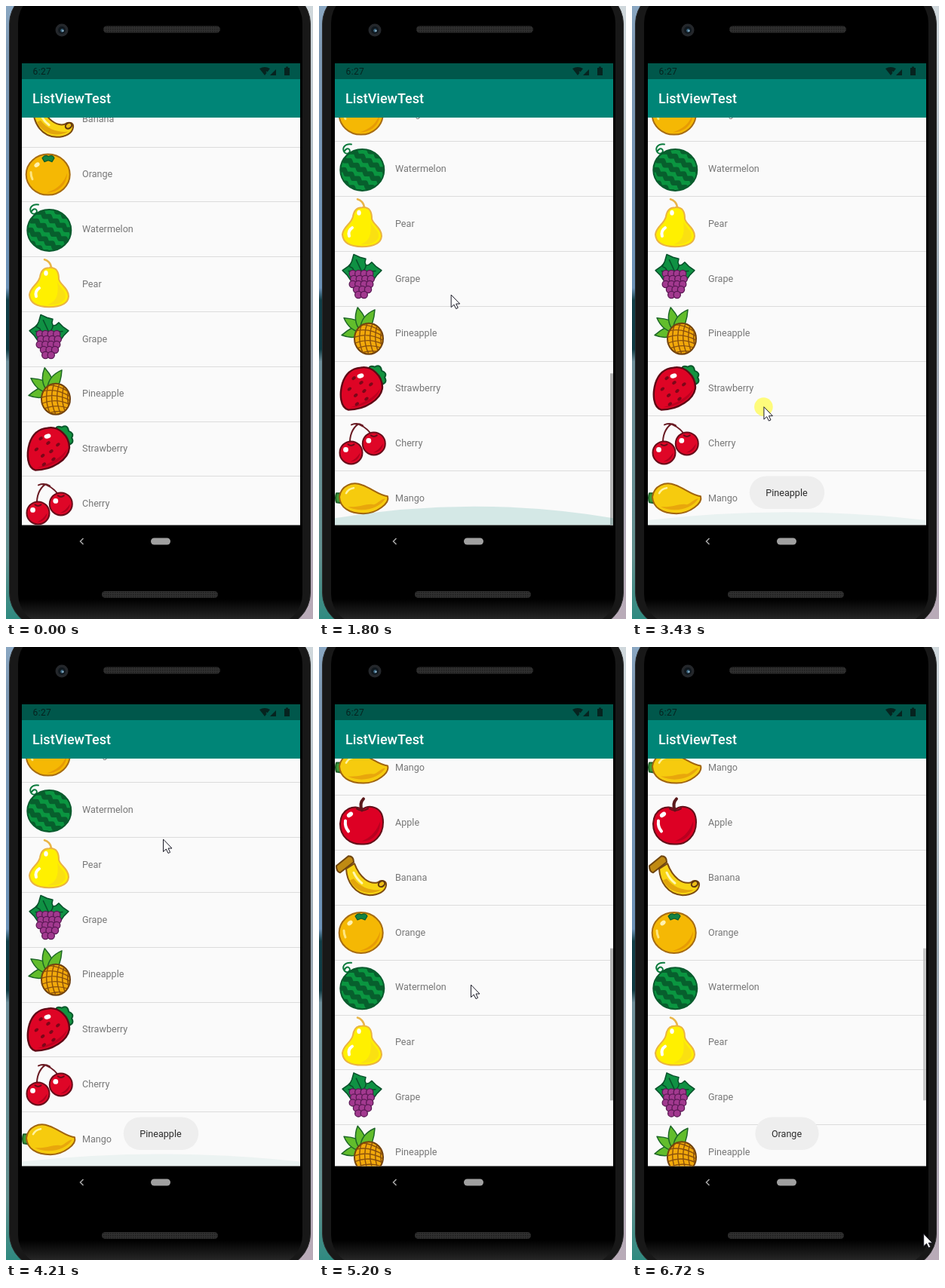
An HTML page for the animation above (7150 ms loop, 407x813 px).

```html
<!DOCTYPE html>
<html lang="en">
<head>
<meta charset="utf-8">
<title>ListViewTest</title>
<style>
  html, body { margin: 0; width: 100%; height: 100%; overflow: hidden; background: #000; }
  svg { display: block; width: 100vw; height: 100vh; }
  text { font-family: Roboto, sans-serif; font-size: 12.6px; }
  .label { fill: #777; }
  .line { fill: #dcdcdc; shape-rendering: crispEdges; }
  symbol { overflow: visible; stroke-width: 2; stroke-linejoin: round; stroke-linecap: round; }
  .n { fill: none; }
  .w { fill: #fff; stroke: none; }
  .shade { stroke: none; }
</style>
</head>
<body>
<svg viewBox="0 0 407 813" preserveAspectRatio="none">
  <defs>
    <linearGradient id="left" x2="0" y2="1">
      <stop offset="0" stop-color="#8aa7c2"/><stop offset=".07" stop-color="#7e99b3"/>
      <stop offset=".46" stop-color="#6c92b8"/><stop offset=".48" stop-color="#113f48"/>
      <stop offset=".56" stop-color="#0e3a42"/><stop offset=".58" stop-color="#6f8f9b"/>
      <stop offset=".9" stop-color="#62908f"/><stop offset="1" stop-color="#2f8a80"/>
    </linearGradient>
    <linearGradient id="right" x2="0" y2="1">
      <stop offset="0" stop-color="#d0d8dc"/><stop offset=".5" stop-color="#9aa8b3"/>
      <stop offset="1" stop-color="#b9abb8"/>
    </linearGradient>
    <linearGradient id="chin" x2="0" y2="1">
      <stop offset=".96" stop-color="#000"/><stop offset="1" stop-color="#303030"/>
    </linearGradient>
    <pattern id="mesh" width="3" height="3" patternUnits="userSpaceOnUse">
      <path d="M0 0H3V3H0Z" fill="#303030"/><path d="M0 0H1.5V1.5H0Z" fill="#1c1c1c"/>
    </pattern>
    <clipPath id="view"><path d="M21 148H390V688.5H21Z"/></clipPath>
    <clipPath id="melon"><ellipse cx="36.3" cy="38" rx="29" ry="27.5"/></clipPath>
    <clipPath id="pine"><ellipse cx="45" cy="43.5" rx="19" ry="20.5"/></clipPath>

    <symbol id="Apple">
      <path d="M36 19C46 12 64 15 64 36C64 54 51 66 37 65C20 66 7 55 7 38C8 17 27 12 36 19Z" fill="#dd0024" stroke="#641019"/>
      <path d="M60 35C61 50 50 62 36 61C48 56 55 48 60 35Z" fill="#b9001f" class="shade"/>
      <path d="M36 20Q32 11 38 5" class="n" stroke="#5b1a1c" stroke-width="4"/>
      <path d="M29 18Q36 23 44 18" class="n" stroke="#641019"/>
      <ellipse cx="20" cy="26" rx="4.5" ry="3" transform="rotate(-35 20 26)" class="w"/>
      <path d="M14 34Q13 42 18 48" class="n" stroke="#fff" stroke-width="4"/>
    </symbol>
    <symbol id="Banana">
      <path d="M15 25C16 42 26 59 46 60C58 60 67 55 68 47C69 41 62 39 57 43C46 46 33 37 26 18Z" fill="#f8d414" stroke="#7e4d12"/>
      <path d="M20 40C27 56 47 61 61 53C48 54 34 50 25 38Z" fill="#e3a60c" class="shade"/>
      <path d="M2 21L18 8Q25 8 25 16L7 30Q2 29 2 21Z" fill="#c08a12" stroke="#6e4510"/>
      <ellipse cx="62" cy="45" rx="4.5" ry="3.5" fill="#edbe18" stroke="#5e3510" transform="rotate(-35 62 45)"/>
      <path d="M25 30Q29 39 36 44" class="n" stroke="#fff8b0" stroke-width="3"/>
    </symbol>
    <symbol id="Orange">
      <ellipse cx="34.7" cy="37" rx="29" ry="27" fill="#f5b804" stroke="#a76c12"/>
      <path d="M60 35C60 51 48 61 33 61C48 56 56 48 60 35Z" fill="#e79b05" class="shade"/>
      <path d="M27 15Q31 10 35 13Q41 10 43 15L40 20L35 18L30 20Z" fill="#138443" stroke="#0b5a2c" stroke-width="1.2"/>
      <ellipse cx="20" cy="24" rx="4" ry="2.7" transform="rotate(-38 20 24)" fill="#fff2b0"/>
      <path d="M12 34Q12 39 14 43" class="n" stroke="#ffe680" stroke-width="3"/>
    </symbol>
    <symbol id="Watermelon">
      <path d="M22 4C12 3 9 10 13 15C17 19 23 13 18 10Q15 9 13 13" class="n" stroke="#0b7a3c"/>
      <ellipse cx="36.3" cy="38" rx="29" ry="27.5" fill="#0a9540" stroke="#08592d"/>
      <g clip-path="url(#melon)"><g id="stripes" class="n" stroke="#075f2d" stroke-width="6.5" transform="translate(36 38) rotate(32)"></g></g>
    </symbol>
    <symbol id="Pear">
      <path d="M39 16C39 9 34 5 30 4" class="n" stroke="#e9b548" stroke-width="2.6"/>
      <path d="M36 15C47 14 49 22 49 30C51 38 62 42 62 53C61 64 48 67 36 67C22 67 11 63 10 51C11 40 22 37 24 27C25 20 29 15 36 15Z" fill="#fff000" stroke="#eab441"/>
      <path d="M47 33C51 43 59 45 58 54C55 63 43 65 34 64C47 59 49 50 47 33Z" fill="#fae012" class="shade"/>
      <ellipse cx="32" cy="22" rx="2.7" ry="3.5" class="w"/>
      <path d="M23 42Q17 46 19 53" class="n" stroke="#fff" stroke-width="4"/>
    </symbol>
    <symbol id="Grape">
      <g id="vine" fill="#0f9143" stroke="#07502a" stroke-width="1.5"></g>
      <g id="bunch" fill="#a2398f" stroke="#591853" stroke-width="1.3"></g>
    </symbol>
    <symbol id="Pineapple">
      <g id="crown" fill="#62bd2c" stroke="#1d6727" stroke-width="1.5"></g>
      <ellipse cx="45" cy="43.5" rx="19" ry="20.5" fill="#f2a90b" stroke="#70410d"/>
      <g clip-path="url(#pine)" id="lattice" class="n" stroke="#8a500c" stroke-width="1.4"></g>
    </symbol>
    <symbol id="Strawberry">
      <path d="M45 12Q45 5 53 8Q61 4 62 13Q70 16 66 22Q71 30 59 32Z" fill="#12933f" stroke="#08582c"/>
      <path d="M34 9C49 6 63 20 63 35C62 51 40 65 18 65C7 62 6 44 10 30C14 17 23 10 34 9Z" fill="#de0425" stroke="#5f0915" stroke-width="2.4"/>
      <path d="M60 37C57 51 39 61 20 62C38 56 52 49 60 37Z" fill="#be001f" class="shade"/>
      <g id="seeds" fill="#7c0718"></g>
      <ellipse cx="34" cy="20" rx="4.5" ry="3" transform="rotate(-15 34 20)" class="w"/>
    </symbol>
    <symbol id="Cherry">
      <path d="M20 39Q19 20 31 11Q45 17 51 29M22 12Q30 9 37 13" class="n" stroke="#6a1c24"/>
      <g id="cherries"></g>
    </symbol>
    <symbol id="Mango">
      <path d="M7 30L2 30Q0 36 2 42L8 43Z" fill="#3d9b37" stroke="#20602a"/>
      <path d="M6 35C8 20 23 14 36 19C48 23 59 33 70 34C73 43 56 57 38 57C19 57 7 49 6 35Z" fill="#f6cb0e" stroke="#a0640f"/>
      <path d="M67 37C59 50 36 57 17 48C34 49 43 43 51 45C57 44 60 38 67 37Z" fill="#e8a60c" class="shade"/>
      <path d="M15 30Q18 24 25 23" class="n" stroke="#fff3a0" stroke-width="2.5"/>
    </symbol>
  </defs>

  <path d="M0 0H204V813H0Z" fill="url(#left)"/>
  <path d="M204 0H407V813H204Z" fill="url(#right)"/>
  <rect x="4.5" y="-22" width="399" height="846" rx="46" fill="#181818" stroke="#2a2a2a"/>
  <rect x="16" y="-18" width="377" height="838" rx="40" fill="url(#chin)"/>
  <circle cx="74" cy="32" r="8.5" fill="#24272b"/><circle cx="74" cy="32" r="5" fill="#10181e"/>
  <circle cx="74.5" cy="32.5" r="2.2" fill="#426d88"/><circle cx="75.5" cy="33" r=".9" fill="#b5d5e5"/>
  <rect x="129" y="26.5" width="155" height="9" rx="4.5" fill="url(#mesh)"/>
  <rect x="127" y="776" width="154" height="9" rx="4.5" fill="url(#mesh)"/>

  <path d="M21 147H390V688.5H21Z" fill="#fafafa"/>
  <g clip-path="url(#view)">
    <g id="list"></g>
    <rect id="bar" x="386" width="4" fill="#b5b5b5"/>
    <path id="glow" d="M-184.5 0V-6Q0-26 184.5-6V0Z" fill="#008577"/>
  </g>

  <path d="M21 76H390V97H21Z" fill="#00574b"/>
  <path d="M21 97H390V148H21Z" fill="#008577"/>
  <text x="35.5" y="91" fill="#06231f" style="font-size:12px;letter-spacing:.4px">6:27</text>
  <g fill="#06231f">
    <path d="M336 83Q343 79 350 83L343 92Z"/><path d="M358 84V92H350Z"/>
    <path d="M369 82H371V80.5H374V82H376V92H369Z"/>
    <path d="M345 87L349 91M349 87L345 91" stroke="#00574b" stroke-width="1.3"/>
  </g>
  <text x="35" y="129.3" fill="#fff" style="font-size:18px;font-weight:500">ListViewTest</text>

  <path d="M102.5 706L98.5 710L102.5 714" fill="none" stroke="#aaa" stroke-width="1.5"/>
  <rect x="192" y="705.5" width="26" height="9" rx="4.5" fill="#a0a0a0"/>

  <g id="toast">
    <rect y="623.5" height="43.5" rx="21.7" fill="#eee"/>
    <text x="205" y="650.3" text-anchor="middle" fill="#2c2c2c"></text>
  </g>
  <g id="cursor">
    <circle id="press" r="12.3" fill="#fffb4a" fill-opacity=".72"/>
    <path d="M.5 0V16.5L4.3 13L7 18.5L9.6 17.3L7 12H12Z" fill="#fff" stroke="#1c1c28"/>
  </g>
</svg>
<script>
const $ = id => document.getElementById(id);
const set = (el, attrs) => {
  for (const k in attrs) el.setAttribute(k, attrs[k]);
  return el;
};
const add = (parent, tag, attrs, text = '') => {
  const el = set(document.createElementNS('http://www.w3.org/2000/svg', tag), attrs);
  el.textContent = text;
  return parent.appendChild(el);
};

const LOOP = 7150, STEP = 110.4, ROW = 72.8, TOP = 147, VIEW = 542;
const fruits = 'Apple Banana Orange Watermelon Pear Grape Pineapple Strawberry Cherry Mango'.split(' ');
const COUNT = fruits.length * 2;

// Repeated fruit details
for (let i = 0; i < 5; i++) {
  add($('stripes'), 'path', { d: `M-42 ${i * 14 - 30}` + 'l5 4l6-4'.repeat(8) });
  const grapes = Math.min(4, 6 - i);
  for (let j = 0; j < grapes; j++) {
    add($('bunch'), 'circle', { cx: 35 + (j - (grapes - 1) / 2) * 7.5 + i % 2 * 1.5, cy: 30 + i * 7, r: 4.6 });
  }
}
for (const angle of [-85, 85, -25]) {
  add($('vine'), 'path', {
    d: 'M0 0Q-10-3-9-10L-12-14L-6-19L0-26L6-19L12-14L9-10Q10-3 0 0V-18',
    transform: `translate(36 28) rotate(${angle})`
  });
}
for (let i = 0; i < 4; i++) {
  add($('crown'), 'path', { d: 'M-4 2Q-12-14 0-30Q9-12 6 2Z', transform: `translate(38 31) rotate(${i * 45 - 105})` });
}
for (let i = -3; i <= 3; i++) {
  add($('lattice'), 'path', { d: `M${20 + i * 3} ${44 + i * 7}q24-12 48 4M${44 + i * 7} 20q-10 24 3 48` });
}
for (let i = 0; i < 8; i++) {
  const a = i * 2.4, r = 7 * Math.sqrt(i + .5);
  add($('seeds'), 'ellipse', {
    rx: 3, ry: 2, transform: `translate(${34 + r * Math.cos(a)} ${40 + r * Math.sin(a)}) rotate(-40)`
  });
}
for (const [x, y] of [[21.5, 49], [51.8, 37]]) {
  const g = add($('cherries'), 'g', { transform: `translate(${x} ${y})` });
  add(g, 'circle', { r: 15, fill: '#df0627', stroke: '#690d1a' });
  add(g, 'path', { d: 'M12 0Q11 11-1 12Q7 8 12 0Z', fill: '#b0001e' });
  add(g, 'path', { d: 'M-4-11Q0-8 4-11', class: 'n', stroke: '#690d1a' });
  add(g, 'circle', { cx: -7, cy: -4, r: 3.4, class: 'w' });
}

const shades = Array.from({ length: COUNT }, (_, i) => {
  const name = fruits[i % fruits.length];
  const row = add($('list'), 'g', { transform: `translate(21 ${i * ROW})` });
  const shade = add(row, 'rect', { width: 369, height: ROW });
  add(row, 'use', { href: '#' + name });
  add(row, 'text', { x: 80, y: 40.6, class: 'label' }, name);
  add(row, 'rect', { width: 369, height: 1, class: 'line' });
  return shade;
});

// Cursor stops: start, end, x, y
const moves = [
  [100, 680, 168, 528], [680, 870, 183, 555], [870, 1120, 183, 477], [1120, 1500, 176, 381],
  [1700, 2250, 131, 450], [2560, 3150, 172, 570], [3190, 3800, 180, 443], [3860, 4180, 208, 255],
  [4290, 4830, 195, 408], [4850, 5170, 201, 448], [5180, 5500, 190, 380], [6180, 6640, 388, 782]
];
const presses = [[870, 1700], [2280, 2420], [3180, 3850], [4290, 4600], [4800, 5050], [5490, 5620]];
const taps = [{ row: 16, on: 2300, off: 2560 }, { row: 13, on: 4740, off: 4850 }, { row: 12, on: 5500, off: 5740 }];
const toasts = [{ name: 'Pineapple', on: 2420, off: 4430 }, { name: 'Orange', on: 5620, off: LOOP }];

const ramp = (t, a, b) => Math.min(1, Math.max(0, (t - a) / (b - a)));
const ease = (t, a, b) => {
  const x = ramp(t, a, b);
  return x * x * (3 - 2 * x);
};
const pulse = (t, on, off, rise, fall) => ramp(t, on, on + rise) * (1 - ramp(t, off, off + fall));

function draw(t) {
  const y = 834 + 80 * ease(t, 870, 1120) - 187 * ease(t, 4290, 4840) - 48.4 * ease(t, 4840, 5170);
  const scale = VIEW / (COUNT * ROW);
  set($('list'), { transform: `translate(0 ${TOP - y})` });
  set($('bar'), {
    y: TOP + y * scale, height: VIEW * scale,
    opacity: pulse(t, 870, 2530, 1, 300) + pulse(t, 4290, 6200, 1, 1500)
  });

  const pull = pulse(t, 1230, 1680, 220, 520) + pulse(t, 3300, 3890, 300, 420);
  set($('glow'), { transform: `translate(205.5 688.5) scale(1 ${.7 + pull})`, opacity: pull * .18 });

  for (const { row, on, off } of taps) set(shades[row], { 'fill-opacity': pulse(t, on, off, 100, 300) * .112 });
  shades.forEach((s, i) => taps.some(tap => tap.row === i) || set(s, { 'fill-opacity': 0 }));

  const { name, on, off } = toasts.find(item => t < item.off + 300), [box, text] = $('toast').children;
  text.textContent = name;
  const width = text.getComputedTextLength() + 44;
  set(box, { x: 205.5 - width / 2, width });
  set($('toast'), { opacity: pulse(t, on, off, 240, 220) });

  const [cx, cy] = moves.reduce(([px, py], [a, b, qx, qy]) => {
    const f = ease(t, a, b);
    return [px + (qx - px) * f, py + (qy - py) * f];
  }, [287, 766]);
  set($('cursor'), {
    transform: `translate(${cx} ${cy})`,
    visibility: t >= 100 && t < 6700 ? 'visible' : 'hidden'
  });
  set($('press'), { opacity: presses.some(([a, b]) => t >= a && t < b) ? 1 : 0 });
}

// The screen refreshes in even steps
const snap = t => Math.floor((t + 10) / STEP) * STEP - 10;
const start = performance.now();
function tick() {
  draw(snap((performance.now() - start) % LOOP));
  requestAnimationFrame(tick);
}
tick();
</script>
</body>
</html>
```
